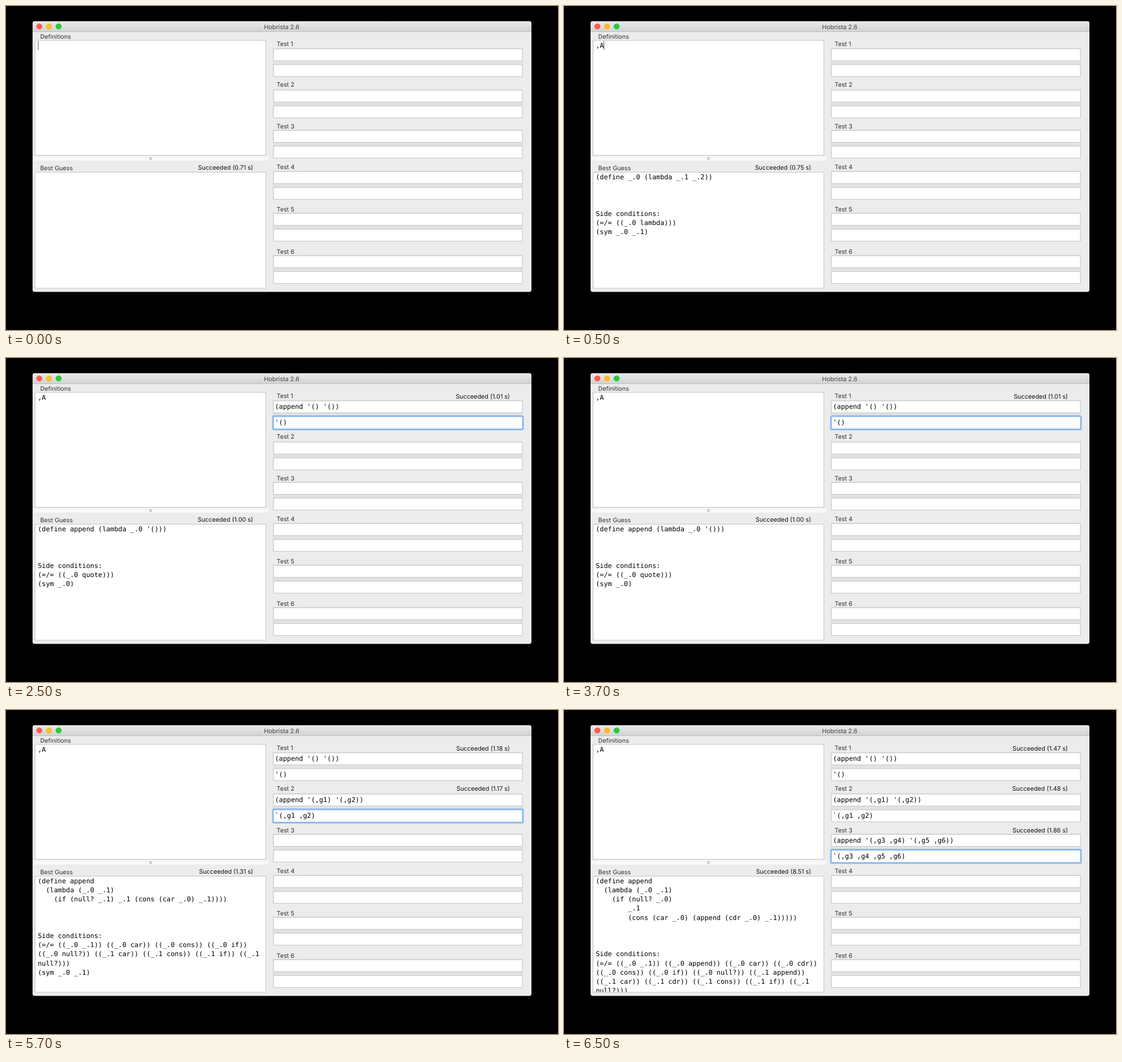
These frames come from a looping animation (976x574 px, 8000 ms). An HTML page:

```html
<!DOCTYPE html>
<html lang="en">
<head>
<meta charset="utf-8">
<title>Program synthesis demo</title>
<style>
  html, body { margin: 0; width: 100%; height: 100%; overflow: hidden; background: #000; }
  svg { display: block; width: 976px; height: 574px; }
  text { white-space: pre; text-rendering: geometricPrecision; }
  .ui { font: 10.8px Inter, Roboto, sans-serif; fill: #303030; }
  .status { fill: #111; text-anchor: end; }
  .title { fill: #404040; text-anchor: middle; }
  .code { font: 11.83px "DejaVu Sans Mono", "Liberation Mono", monospace; fill: #000; }
</style>
</head>
<body>
<svg id="stage" viewBox="0 0 976 574">
  <defs>
    <linearGradient id="bar" x1="0" y1="0" x2="0" y2="1">
      <stop offset="0" stop-color="#e9e9e9"/>
      <stop offset="1" stop-color="#d2d2d2"/>
    </linearGradient>
    <clipPath id="guessClip"><rect x="52" y="295" width="407" height="204.5"/></clipPath>
  </defs>
</svg>
<script>
const LOOP = 8000;
const TOPS = [76, 149, 220.5, 293.5, 367.5, 442.5];
const LABEL_Y = [71, 143, 216.5, 289, 363.5, 438.5];
const STATUS_Y = [72, 143, 216.5];

const TESTS = [
  ["(append '() '())", "'()"],
  ["(append '(,g1) '(,g2))", "`(,g1 ,g2)"],
  ["(append '(,g3 ,g4) '(,g5 ,g6))", "`(,g3 ,g4 ,g5 ,g6)"]
];

// Each step: start time, guess time, times of the filled tests, caret x, guess text
const STEPS = [
  { at: 0, took: "0.71", tests: [], caret: 57, guess: "" },
  { at: 500, took: "0.75", tests: [], caret: 70.5, defs: ",A", guess:
`(define _.0 (lambda _.1 _.2))



Side conditions:
(=/= ((_.0 lambda)))
(sym _.0 _.1)` },
  { at: 2500, took: "1.00", tests: ["1.01"], defs: ",A", guess:
`(define append (lambda _.0 '()))



Side conditions:
(=/= ((_.0 quote)))
(sym _.0)` },
  { at: 4500, took: "1.31", tests: ["1.18", "1.17"], defs: ",A", guess:
`(define append
  (lambda (_.0 _.1)
    (if (null? _.1) _.1 (cons (car _.0) _.1))))



Side conditions:
(=/= ((_.0 _.1)) ((_.0 car)) ((_.0 cons)) ((_.0 if))
((_.0 null?)) ((_.1 car)) ((_.1 cons)) ((_.1 if)) ((_.1
null?)))
(sym _.0 _.1)` },
  { at: 6500, took: "8.51", tests: ["1.47", "1.48", "1.86"], defs: ",A", guess:
`(define append
  (lambda (_.0 _.1)
    (if (null? _.0)
        _.1
        (cons (car _.0) (append (cdr _.0) _.1)))))



Side conditions:
(=/= ((_.0 _.1)) ((_.0 append)) ((_.0 car)) ((_.0 cdr))
((_.0 cons)) ((_.0 if)) ((_.0 null?)) ((_.1 append))
((_.1 car)) ((_.1 cdr)) ((_.1 cons)) ((_.1 if)) ((_.1
null?)))` }
];

const stage = document.getElementById("stage");

function add(parent, tag, attrs = {}) {
  const el = document.createElementNS("http://www.w3.org/2000/svg", tag);
  for (const key in attrs) el.setAttribute(key, attrs[key]);
  return parent.appendChild(el);
}
function rect(parent, x, y, width, height, fill, more) {
  return add(parent, "rect", { x, y, width, height, fill, ...more });
}
function text(parent, x, y, str, cls) {
  add(parent, "text", { x, y, class: cls }).textContent = str;
}
function box(x, y, w, h) {
  rect(stage, x, y, w, h, "#fff", { stroke: "#c6c6c6" });
}

function drawWindow() {
  rect(stage, 47, 27, 882, 479.5, "#ececec", { rx: 4 });
  add(stage, "path", { d: "M47 46V31q0-4 4-4H925q4 0 4 4V46Z", fill: "url(#bar)" });
  rect(stage, 47, 45, 882, 1, "#bdbdbd");
  ["#fc5b55", "#fdb92f", "#2bc840"].forEach((fill, i) =>
    add(stage, "circle", { cx: 59 + 17 * i, cy: 36.3, r: 5.3, fill }));
  text(stage, 487.5, 40.5, "Hobrista 2.6", "ui title");

  text(stage, 60.5, 57.5, "Definitions", "ui");
  box(51.5, 61, 408, 203.5);
  rect(stage, 47, 266.5, 417, 7.5, "#f8f8f8");
  add(stage, "circle", { cx: 255.5, cy: 270.3, r: 2, fill: "#d8d8d8", stroke: "#aaa", "stroke-width": 0.8 });
  text(stage, 60.5, 290.5, "Best Guess", "ui");
  box(51.5, 294.5, 408, 205.5);

  TOPS.forEach((y, i) => {
    text(stage, 478.5, LABEL_Y[i], "Test " + (i + 1), "ui");
    rect(stage, 471.5, y - 2, 442.5, 51.5, "#e2e2e2");
    box(473, y, 440, 21);
    box(473, y + 28, 440, 21);
  });
}

function drawStep(step) {
  const g = add(stage, "g", { visibility: "hidden" });
  const status = (x, y, secs) => text(g, x, y, `Succeeded (${secs} s)`, "ui status");

  status(437, 290, step.took);
  if (step.defs) text(g, 56.2, 74, step.defs, "code");
  if (step.caret) rect(g, step.caret - 0.5, 62, 1, 16, "#555");

  const guess = add(g, "g", { "clip-path": "url(#guessClip)" });
  step.guess.split("\n").forEach((line, i) =>
    text(guess, 56.2, 306.8 + 16.2 * i, line, "code"));

  step.tests.forEach((secs, i) => {
    const y = TOPS[i];
    status(891, STATUS_Y[i], secs);
    if (i === step.tests.length - 1) {
      rect(g, 472, y + 27, 442, 23.5, "#fff", { rx: 1.5, stroke: "#8db8ea", "stroke-width": 3 });
    }
    TESTS[i].forEach((str, row) => text(g, 475.4, y + 14.3 + 28 * row, str, "code"));
  });
  return g;
}

drawWindow();
const layers = STEPS.map(drawStep);
const start = performance.now();

function render(now) {
  const t = Math.max(0, now - start) % LOOP;
  const current = STEPS.filter(s => s.at <= t).length - 1;
  layers.forEach((g, i) =>
    g.setAttribute("visibility", i === current ? "visible" : "hidden"));
  requestAnimationFrame(render);
}
render(start);
</script>
</body>
</html>
```
